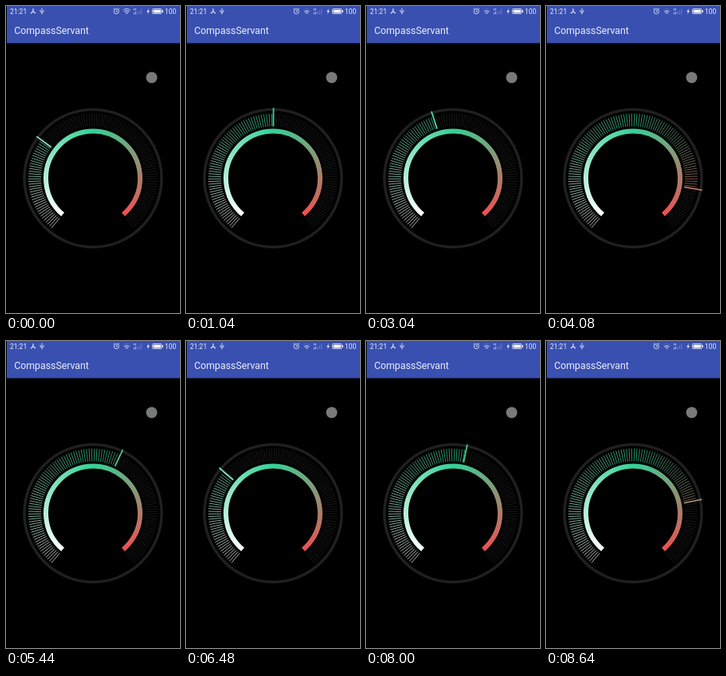
These frames come from a looping animation (218x384 px, 8720 ms). An HTML page with a canvas:

```html
<!DOCTYPE html>
<html lang="en">
<head>
<meta charset="utf-8">
<title>Compass dial</title>
<style>
html, body { margin: 0; width: 100%; height: 100%; overflow: hidden; background: #000; }
svg, canvas { position: absolute; left: 0; top: 0; }
text { font-family: Roboto, sans-serif; fill: #eceef8; }
</style>
</head>
<body>
<canvas id="dial" width="218" height="384"></canvas>
<svg width="218" height="384" fill="none" stroke="#dde1f2" stroke-width=".9">
  <path d="M1 0H218V46.5H1Z" fill="#3950b0" stroke="none"/>
  <text x="5" y="10" font-size="8.5" stroke="none">21:21</text>
  <text x="199" y="10" font-size="8.5" stroke="none">100</text>
  <text x="10.3" y="35" font-size="12.3" stroke="none">CompassServant</text>
  <!-- status icons -->
  <path d="M34 3.2V6.8L31 9.2M34 6.8L37 9.2" stroke-width="1.3"/>
  <path d="M45 2.5V10.5M43 5V7L45 8.5L47 7V5"/>
  <circle cx="138.3" cy="6.7" r="3.1"/>
  <path d="M138.3 4.8V7H140M134.6 4L136.2 2.6M142 4L140.4 2.6" stroke-width=".8"/>
  <path id="wifi" d="M146.8 5.4Q151.3 1.4 155.8 5.4"/>
  <path d="M148.4 7.3Q151.3 4.8 154.2 7.3M150 9.2Q151.3 8 152.6 9.2" stroke-width="1.1"/>
  <path d="M160.5 3V5.5M162.5 3V5.5M160.5 8V10.5M162.5 7V10.5" stroke-width=".8"/>
  <path d="M165 7V10.5M167.3 5.5V10.5M169.8 3.5V10.5" stroke="#7384cb"/>
  <path d="M178.8 3L176.4 7.2H178L177.2 10.5L179.8 6H178.2Z" fill="#fff" stroke="none"/>
  <rect x="183.4" y="3.6" width="11.6" height="6" rx="1"/>
  <path d="M184.6 4.8H193.8V8.4H184.6ZM195.5 5.2H196.8V8H195.5Z" fill="#fff" stroke="none"/>
  <circle cx="182.5" cy="89.5" r="7" fill="#787a79" stroke="none"/>
</svg>
<script>
const LOOP = 8720, STEP = 80, TICKS = 119;
const CX = 109, CY = 215.5, START = 130 * Math.PI / 180, SWEEP = 280 * Math.PI / 180;
const FIRST = .309;
// begin ms, end ms, value reached
const moves = [
  [320, 1600, .631], [1680, 2800, .423], [2880, 4400, .907],
  [4640, 6160, .321], [6400, 7440, .39], [7520, 8640, .781]
];
const ctx = document.getElementById('dial').getContext('2d');
const wifi = document.getElementById('wifi');

const hue = ctx.createConicGradient(START, CX, CY);
const span = SWEEP / (2 * Math.PI);
hue.addColorStop(0, '#fff');
hue.addColorStop(span / 2, '#34d196');
hue.addColorStop(span, '#f14e50');
hue.addColorStop((1 + span) / 2, '#f14e50');
hue.addColorStop((1 + span) / 2, '#fff');

function valueAt(t) {
  let value = FIRST;
  for (const [begin, end, to] of moves) {
    if (t <= begin) break;
    const p = Math.min(1, (t - begin) / (end - begin));
    value += (to - value) * (1 - Math.cos(p * Math.PI)) / 2;
  }
  return value;
}

function arc(radius, from, to, width, color) {
  ctx.beginPath();
  ctx.arc(CX, CY, radius, from, to);
  ctx.lineWidth = width;
  ctx.strokeStyle = color;
  ctx.stroke();
}

function spoke(value, inner, outer, width, color) {
  const a = START + value * SWEEP, x = Math.cos(a), y = Math.sin(a);
  ctx.beginPath();
  ctx.moveTo(CX + x * inner, CY + y * inner);
  ctx.lineTo(CX + x * outer, CY + y * outer);
  ctx.lineWidth = width;
  ctx.strokeStyle = color;
  ctx.stroke();
}

function draw(now) {
  const t = Math.floor(now % LOOP / STEP) * STEP;
  const value = valueAt(t);
  ctx.clearRect(0, 0, 218, 384);
  arc(86, 0, 2 * Math.PI, 3.4, '#202020');
  for (let i = 0; i <= TICKS; i++) {
    const v = i / TICKS;
    spoke(v, 65, 81, .68, v <= value ? hue : '#242424');
  }
  arc(59, START, START + SWEEP, 6, hue);
  spoke(value, 65, 88, 1.8, hue);
  wifi.style.opacity = t < 240 ? 1 : .15;
}

const origin = performance.now();
function loop() {
  draw(performance.now() - origin);
  requestAnimationFrame(loop);
}
loop();
</script>
</body>
</html>
```
